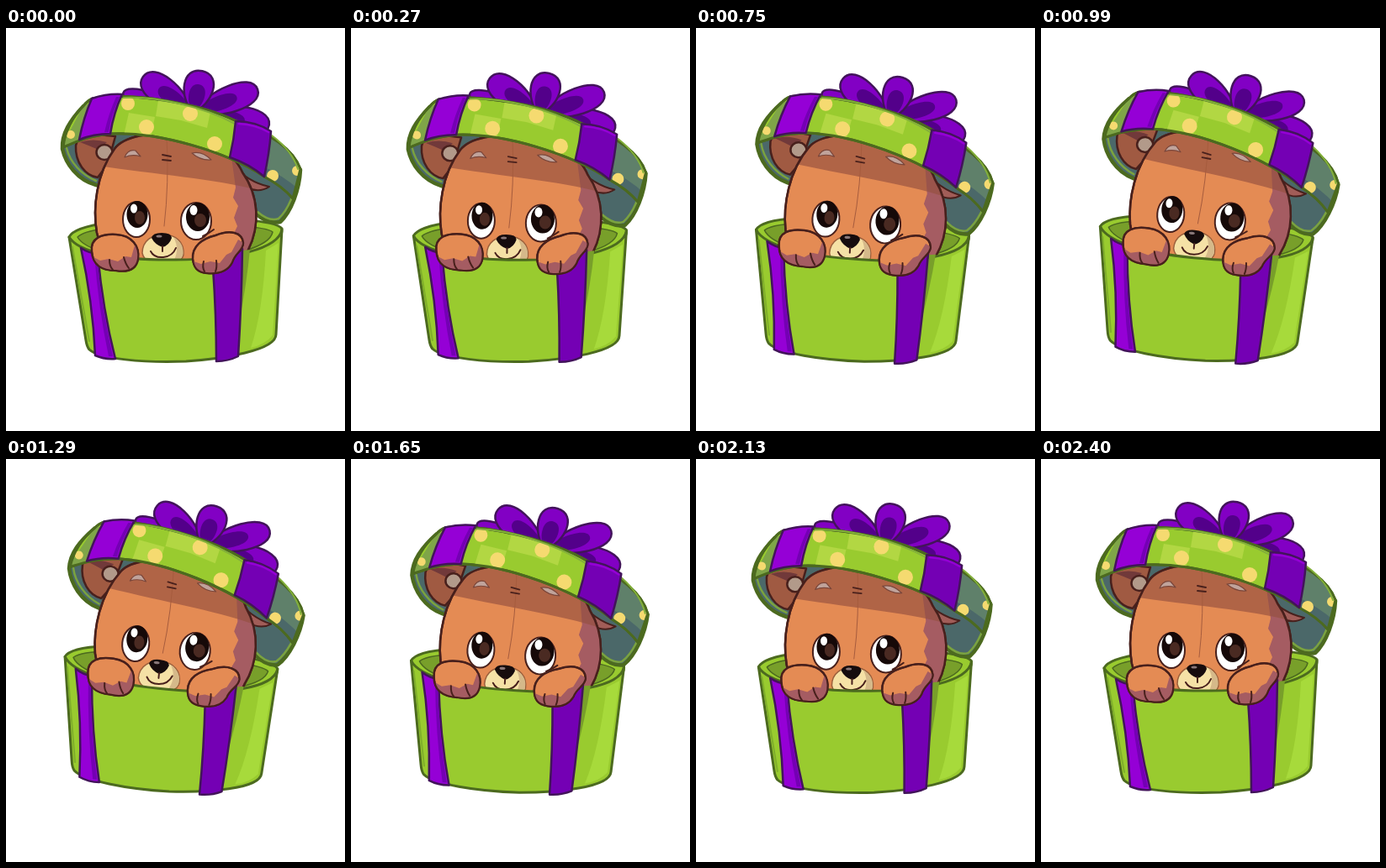
Write an HTML page that moves like this. It is 403 px wide and 480 px high and loops after 2.43 s.

```html
<!DOCTYPE html>
<html lang="en">
<head>
<meta charset="utf-8">
<title>Teddy in a gift box</title>
<style>
html, body { margin: 0; width: 100%; height: 100%; overflow: hidden; background: #fff; }
svg { display: block; width: 100vw; height: 100vh; stroke-linecap: round; stroke-linejoin: round; }
.green { fill: #99cb2f; stroke: #4c6a1f; stroke-width: 3; }
.ribbon { fill: #7400b4; stroke: #42145a; stroke-width: 2.5; }
.bright { fill: #9500d6; }
.fold { fill: #53008a; }
.shine { fill: #a52be0; }
.fur { fill: #e48b54; stroke: #48201c; stroke-width: 2.5; }
.shade { fill: #a55c62; }
.dot { fill: #f5da70; }
.line { fill: none; stroke: #48201c; stroke-width: 2; }
</style>
</head>
<body>
<svg viewBox="0 0 403 480">
  <defs>
    <clipPath id="headClip"><path id="headShape" d="M108 244C103 215 107 174 129 144C150 115 258 118 281 172C301 200 302 236 288 264L276 300H124Z"/></clipPath>
    <clipPath id="bandClip"><path id="bandShape" d="M92 93Q96 87 103 84C150 76 232 90 274 111C314 125 342 145 350 168L341 203Q328 188 307 177C262 147 180 123 124 126C96 129 82 136 68 142C70 123 79 106 92 93Z"/></clipPath>
    <clipPath id="pawLeft"><path id="pawLeftShape" d="M102 266C100 250 114 245 131 246C150 247 159 260 157 275C155 288 145 291 131 289C112 289 103 281 102 266Z"/></clipPath>
    <clipPath id="pawRight"><path id="pawRightShape" d="M222 275C221 260 233 251 249 247C266 240 281 243 282 256C282 265 272 268 269 279C263 291 251 293 239 292C227 291 223 285 222 275Z"/></clipPath>
  </defs>

  <g class="box">
    <path class="green" d="M75 249C82 233 150 226 202 228C258 226 320 228 328 239C330 262 283 276 202 278C125 279 82 268 75 249Z"/>
    <path d="M85 249C98 237 150 235 202 236C262 234 309 236 317 243C314 259 272 275 202 276C130 277 92 262 85 249Z" fill="#789f2a" stroke="#4c6a1f" stroke-width="1.5"/>
  </g>

  <g class="lid">
    <path d="M92 93C76 110 66 126 67 144C71 162 85 181 107 187C160 200 250 205 298 222Q312 234 326 231C339 219 349 192 350 169C310 110 170 80 92 93Z" fill="#4b6869" stroke="#4c6a1f" stroke-width="4.5"/>
    <path d="M72 143C76 160 90 175 107 182M299 219Q313 231 324 227C335 217 345 195 347 170" fill="none" stroke="#7ba33f" stroke-width="2.5"/>
    <g class="ribbon" id="bow"></g>
  </g>

  <g id="head">
    <path d="M130 129C106 126 85 125 83 140C82 160 94 176 109 178L121 162Z" fill="#a05a42" stroke="#48201c" stroke-width="2.5"/>
    <path d="M88 136Q104 131 120 136L110 145Q96 139 88 136Z" fill="#71393a"/>
    <ellipse cx="117" cy="148" rx="9.5" ry="9" fill="#b29a8a" stroke="#48201c" stroke-width="2.5"/>
    <path d="M265 160Q288 184 313 189Q301 197 286 190Z" fill="#a15d58" stroke="#48201c" stroke-width="2"/>
    <use href="#headShape" class="fur"/>
    <g clip-path="url(#headClip)">
      <path class="shade" d="M266 140L273 190 270 202 276 212 271 226 275 236Q267 253 262 264V300H320V140Z"/>
      <path d="M90 100H320V200C270 180 180 176 90 161Z" fill="#96503f" opacity=".65"/>
    </g>
    <use href="#headShape" fill="none" stroke="#48201c" stroke-width="2.5"/>
    <path d="M191 128Q194 185 188 236" class="line" style="stroke-width:1;stroke:#a65c3e"/>
    <path d="M186 151l10 2M186 157l10 1" class="line" style="stroke-width:1.8"/>
    <path d="M141 154Q145 144 154 146L160 153Q150 150 141 154ZM221 149Q233 146 244 157Q231 158 221 149Z" fill="#c0a39b" stroke="#7a463a" stroke-width="1.2"/>
    <g stroke="#48201c" stroke-width="2">
      <ellipse cx="155" cy="228" rx="16" ry="21" fill="#fff"/>
      <ellipse cx="226" cy="230" rx="18" ry="22" fill="#fff"/>
    </g>
    <g fill="#160908">
      <ellipse cx="156" cy="222" rx="12.5" ry="16"/>
      <ellipse cx="228" cy="225" rx="14" ry="17"/>
    </g>
    <g fill="#4a2a22">
      <ellipse cx="159" cy="226" rx="6" ry="8"/>
      <ellipse cx="231" cy="229" rx="7" ry="8"/>
    </g>
    <g fill="#fff">
      <ellipse cx="152" cy="215" rx="4" ry="5.5"/>
      <ellipse cx="223" cy="217" rx="4.5" ry="6"/>
    </g>
    <path d="M234 248Q242 244 247 240" class="line"/>
    <path d="M162 268C162 253 174 246 187 246C202 246 212 255 211 270C208 287 166 288 162 268Z" fill="#f5e1a6" stroke="#9b5f3c" stroke-width="1.5"/>
    <path d="M199 249Q213 257 210 271Q206 279 197 281Q208 265 199 249Z" fill="#d5b98a"/>
    <path d="M173 250Q174 244 185 244Q197 244 197 250Q194 259 186 261Q177 258 173 250Z" fill="#160c0d"/>
    <ellipse cx="182" cy="248" rx="3.5" ry="1.6" fill="#887779"/>
    <path d="M186 260V266M172 266Q176 274 187 273Q198 272 202 262" class="line"/>
  </g>

  <g class="box">
    <path class="green" d="M75 249C85 266 130 277 202 276C270 276 324 263 328 240L321 365C321 384 258 394 214 397C163 399 111 394 99 383Q96 379 95 372Z"/>
    <path d="M324 256L317 366Q308 377 291 381Q305 340 309 265Z" fill="#a7da3b"/>
    <path d="M282 265L290 264Q286 305 278 345Z" fill="#789f2a"/>
    <path d="M79 261L99 373" fill="none" stroke="#7fae2b" stroke-width="2"/>
    <path class="ribbon bright" d="M89 262Q98 268 109 269Q115 335 130 394Q117 395 106 390Q103 325 89 262Z"/>
    <path d="M105 270L108 271Q114 335 127 391L122 391Q110 335 105 270Z" fill="#7400b4"/>
    <path class="ribbon" d="M246 286Q266 276 281 263Q280 330 276 391Q264 397 250 397Q250 342 246 286Z"/>
  </g>

  <g id="paws">
    <use href="#pawLeftShape" class="fur"/>
    <path class="shade" clip-path="url(#pawLeft)" d="M100 271L112 277 122 275 133 278 142 272 149 273 154 255 170 260V300H100Z"/>
    <path d="M123 276Q123 284 127 288M140 273Q142 281 146 286" class="line"/>
    <use href="#pawLeftShape" class="line"/>
    <use href="#pawRightShape" class="fur"/>
    <path class="shade" clip-path="url(#pawRight)" d="M220 277L232 281 243 278 254 280 262 270 268 267 276 252 290 260V300H220Z"/>
    <path d="M235 278Q233 285 236 290M250 277Q251 285 249 290" class="line"/>
    <use href="#pawRightShape" class="line"/>
  </g>

  <g class="lid">
    <use href="#bandShape" class="green"/>
    <g clip-path="url(#bandClip)">
      <path d="M182 80L213 86 208 110 178 105ZM213 86L244 95 239 119 208 110ZM146 101L177 106 172 131 140 128Z" fill="#b2d743"/>
      <path d="M66 142L92 92 100 90 86 136Z" fill="#7fa548"/>
      <path d="M312 115L360 160 343 212 302 182Z" fill="#5f806a"/>
      <path d="M304 164Q330 176 349 193L340 215 300 184Z" fill="#4b6869"/>
      <g class="dot" id="dots"></g>
    </g>
    <use href="#bandShape" fill="none" stroke="#4c6a1f" stroke-width="3"/>
    <path d="M140 83C180 81 235 94 272 114M316 128Q340 146 347 168" fill="none" stroke="#83b03a" stroke-width="2"/>
    <path class="ribbon bright" d="M102 84Q120 78 138 79Q128 101 124 126Q104 126 87 133Q92 107 102 84Z"/>
    <path d="M131 82L135 82Q125 104 122 124L117 124Q122 102 131 82Z" fill="#7400b4"/>
    <path class="ribbon" d="M273 111Q296 111 315 123Q313 150 307 177Q289 162 266 154Q271 133 273 111Z"/>
    <path d="M277 114Q297 115 312 124" fill="none" stroke="#9500d6" stroke-width="2.5"/>
  </g>
</svg>
<script>
const get = id => document.getElementById(id);

// Bow loops reach out from the knot: length, half width, angle
const loops = [[86, 12, 196], [92, 20, 9], [82, 19, -20], [73, 20, 216], [51, 21, -77]];
const loopPath = (length, width) =>
  `M0 0C${length * .3} ${-width} ${length} ${-width * 1.2} ${length} 0S${length * .3} ${width} 0 0Z`;
get('bow').innerHTML = loops.map(([length, width, angle]) =>
  `<g transform="translate(222 101) rotate(${angle})">
    <path class="bright" style="fill:#8200c4" d="${loopPath(length, width)}"/>
    <path class="fold" stroke="none" d="${loopPath(length * .68, width * .55)}"/>
  </g>`).join('');

const dots = [[145, 90, 8], [167, 118, 9], [219, 102, 9], [248, 138, 9], [317, 176, 7], [346, 170, 6], [77, 127, 5]];
get('dots').innerHTML = dots.map(([x, y, r]) => `<circle cx="${x}" cy="${y}" r="${r}"/>`).join('');

const STEP = 30, LOOP = 2430, SWAY = 2400;
const boxes = document.querySelectorAll('.box'), lids = document.querySelectorAll('.lid');

const place = (node, x, y, angle, cx, cy) =>
  node.setAttribute('transform', `translate(${x} ${y}) rotate(${angle} ${cx} ${cy})`);

function draw(now) {
  const time = Math.floor(now % LOOP / STEP) * STEP;
  const sway = (1 - Math.cos(2 * Math.PI * time / SWAY)) / 2;
  const dip = 4 * sway * (1 - sway);
  boxes.forEach(box => place(box, -12.5 * sway, dip - 2 * sway, 5.6 * sway, 200, 320));
  place(get('paws'), -10.5 * sway, dip - 2 * sway, 5.6 * sway, 200, 320);
  place(get('head'), 1.5 * sway, 6.3 * dip - 5 * sway, 5.6 * sway, 188, 203);
  lids.forEach(lid => place(lid, 12.5 * sway, 5 * dip - .5 * sway, 6.4 * sway, 187, 98));
  requestAnimationFrame(draw);
}
draw(performance.now());
</script>
</body>
</html>
```
